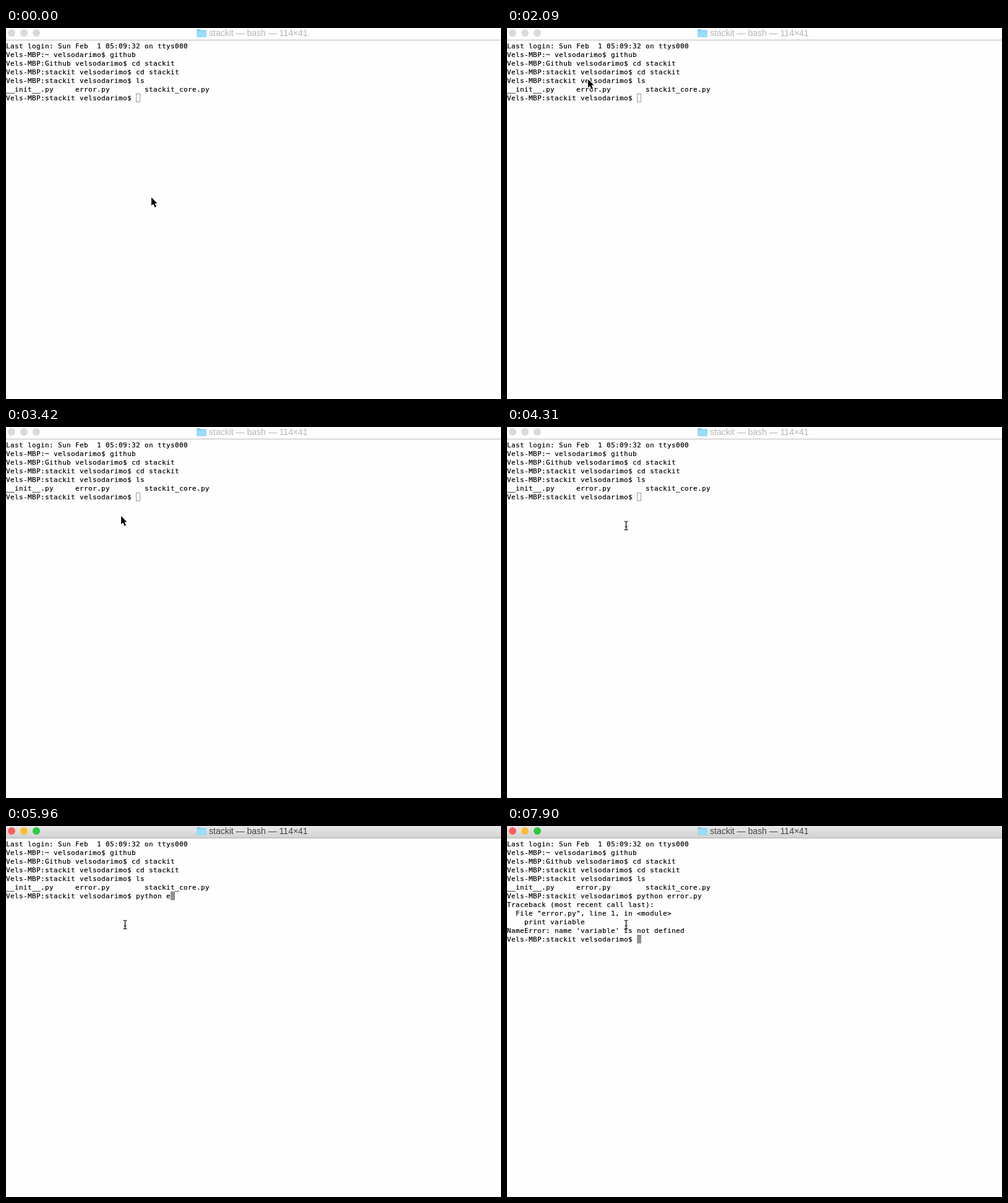
Recreate the animation shown at these times as an HTML page. Size 800 px wide and 600 px high, loop 8 s.

```html
<!DOCTYPE html>
<html lang="en">
<head>
<meta charset="utf-8">
<title>Terminal</title>
<style>
  html, body { margin: 0; width: 100%; height: 100%; overflow: hidden; background: #fefefe; }
  #bar { position: absolute; left: 0; top: 0; width: 800px; height: 19px; border-bottom: 1px solid #b9bdb7; }
  #bar i { position: absolute; top: 2px; width: 12px; height: 12px; border-radius: 50%; background: #dadada; }
  #bar span { position: absolute; left: 328px; top: 0; white-space: pre; color: #b5b5b5;
    font: 14px/17px "Liberation Sans", Arial, sans-serif; }
  #bar.active { background: linear-gradient(#e8e8e8, #d2d2d2); border-color: #afafaf; }
  #bar.active span { color: #434343; }
  #bar.active i { background: var(--lit); }
  #screen { position: absolute; left: 0; top: 23px; margin: 0; color: #000;
    font: 11px/14px "DejaVu Sans Mono", Menlo, monospace; letter-spacing: calc(7px - 1ch);
    -webkit-text-stroke: .2px #000; }
  #caret { position: absolute; box-sizing: border-box; width: 7px; height: 14px; border: 1px solid #999; }
  #caret.active { background: #929292; border-color: #929292; }
  svg { position: absolute; left: 0; top: 0; }
</style>
</head>
<body>
<div id="bar">
  <i style="left:3px;--lit:#fc605b"></i>
  <i style="left:23px;--lit:#fdbc2f"></i>
  <i style="left:43px;--lit:#2bc840"></i>
  <svg width="330" height="18">
    <path d="M308 14V3q0-1 1-1h4.5l1.5 1.5h8q1 0 1 1V14q0 .8-1 .8h-14q-1 0-1-.8z" fill="#7ccaf0"/>
    <path d="M308 5h16V14q0 .8-1 .8h-14q-1 0-1-.8z" fill="#9adcf9"/>
  </svg>
  <span>stackit — bash — 114×41</span>
</div>
<pre id="screen"></pre>
<div id="caret"></div>
<svg width="800" height="600">
  <path id="arrow" d="M1 1V14.2L4 11.4 6.6 17 9 16 6.5 10.6H10.4Z" stroke="#fff" stroke-width="2"
    stroke-linejoin="round" paint-order="stroke"/>
  <path id="beam" d="M189.5 152.5q3 0 3 1.5V165q0 1.5-3 1.5M195.5 152.5q-3 0-3 1.5M192.5 165q0 1.5 3 1.5M190.5 161.5h4"
    fill="none" stroke="#000" stroke-width="1.2"/>
</svg>
<script>
const LOOP = 8000, TICK = 149, LEAD = 16;
const BEAM = 29, FOCUS = 30, ENTER = 53;

const host = "Vels-MBP", user = "velsodarimo";
const prompt = dir => `${host}:${dir} ${user}$ `;
const shell = prompt("stackit");
const command = "python error.py";

const history = [
  "Last login: Sun Feb  1 05:09:32 on ttys000",
  prompt("~") + "github",
  prompt("Github") + "cd stackit",
  shell + "cd stackit",
  shell + "ls",
  "__init__.py     error.py        stackit_core.py"
];
const traceback = [
  "Traceback (most recent call last):",
  '  File "error.py", line 1, in <module>',
  "    print variable",
  "NameError: name 'variable' is not defined"
];

// Key points: [tick, ...values]
const typing = [[32, 0], [37, 7], [39, 7], [43, 12], [46, 12], [47, 13], [48, 13], [49, 15]];
const pointer = [[6, 234, 273], [12, 166, 93], [13, 166, 93], [14, 130, 82], [16, 105, 104],
  [17, 125, 120], [19, 167, 79], [21, 164, 100], [24, 192, 158]];

// Eased, rounded values between the key points around a tick.
function along(keys, tick) {
  const next = keys.findIndex(key => key[0] > tick);
  if (next <= 0) return keys.at(next).slice(1);
  const [from, ...a] = keys[next - 1], [to, ...b] = keys[next];
  const p = (tick - from) / (to - from), eased = p * p * (3 - 2 * p);
  return a.map((value, i) => Math.round(value + (b[i] - value) * eased));
}

const [bar, terminal, caret, arrow, beam] =
  ["bar", "screen", "caret", "arrow", "beam"].map(id => document.getElementById(id));

function draw(time) {
  const tick = Math.floor((time % LOOP + LEAD) / TICK);
  const [typed] = along(typing, tick);
  const lines = [...history, shell + command.slice(0, typed)];
  if (tick >= ENTER) lines.push(...traceback, shell);
  terminal.textContent = lines.join("\n");

  caret.style.left = 7 * lines.at(-1).length + "px";
  caret.style.top = 22 + 14 * (lines.length - 1) + "px";
  bar.className = caret.className = tick >= FOCUS ? "active" : "";

  arrow.setAttribute("transform", `translate(${along(pointer, tick)})`);
  arrow.style.display = tick < BEAM ? "" : "none";
  beam.style.display = tick < BEAM ? "none" : "";
}

const start = performance.now();
function frame() {
  draw(performance.now() - start);
  requestAnimationFrame(frame);
}
frame();
</script>
</body>
</html>
```
